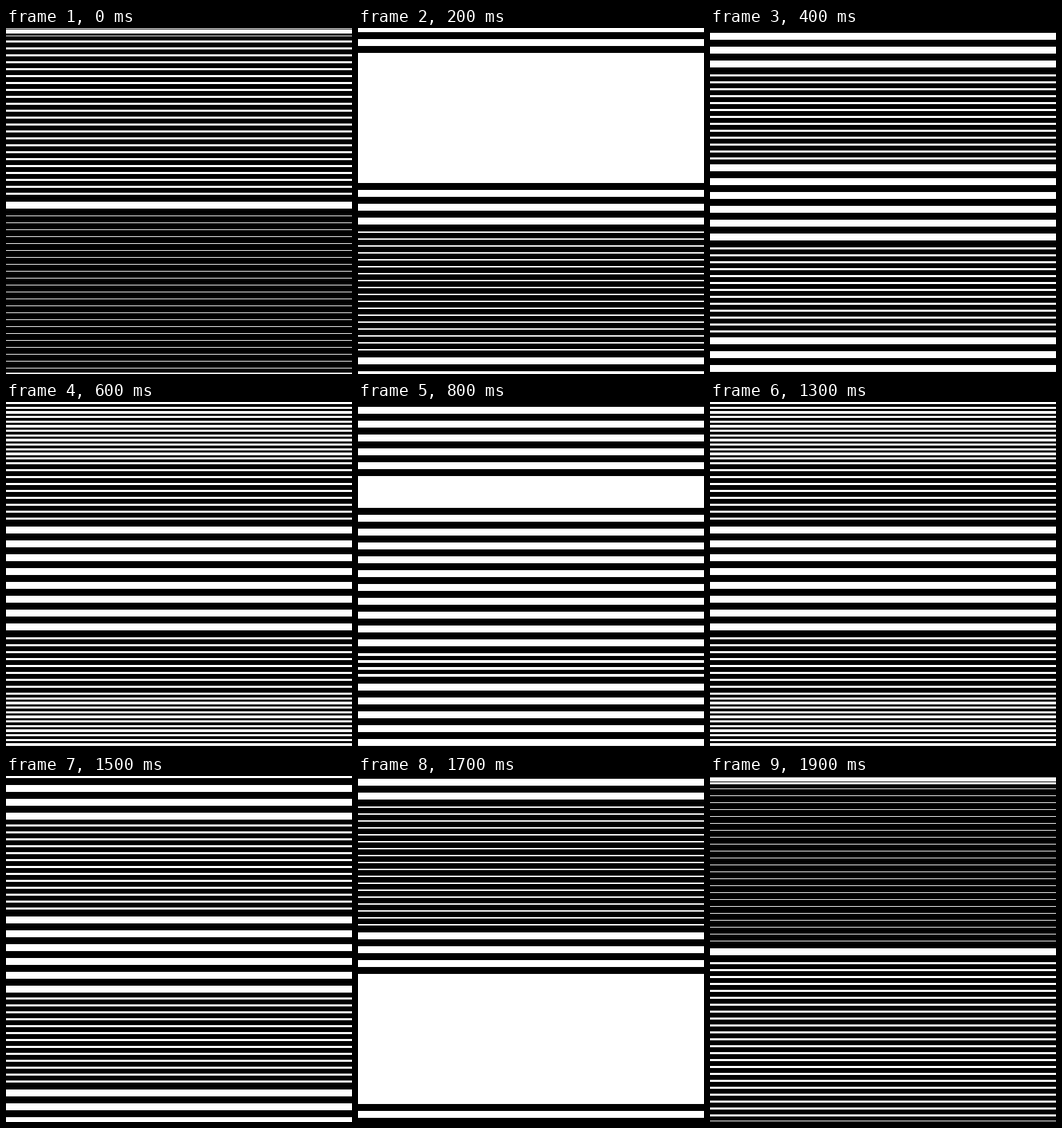
Recreate the animation shown at these times as an HTML page with a canvas. Size 500x500 px, loop 2000 ms.

```html
<!DOCTYPE html>
<html lang="en">
<head>
<meta charset="utf-8">
<title>Interfering stripes</title>
<style>
  html, body { margin: 0; width: 100%; height: 100%; overflow: hidden; background: #fff; }
  canvas { display: block; width: 100vw; height: 100vh; image-rendering: pixelated; }
</style>
</head>
<body>
<canvas id="stage" width="500" height="500"></canvas>
<script>
const SIZE = 500, STEPS = 20, STEP_MS = 100;
const BAND = 10;    // distance between neighbouring edges
const EDGES = 25;   // edges in each sliding group
const ctx = document.getElementById('stage').getContext('2d');

// Number of a group's edges at or above y.
const edgesPassed = (y, start) =>
  Math.max(0, Math.min(EDGES, Math.floor((y - start) / BAND) + 1));

// Endless stripes scroll down while two edge groups slide through each other;
// every edge passed inverts the colour.
function draw(step) {
  const p = step / (STEPS - 1);
  const scroll = 1 + 218 * p;
  const groupA = 272 + 226 * p;
  const groupB = 770 - groupA;
  const seam = SIZE / 2 + 5;

  ctx.fillStyle = '#fff';
  ctx.fillRect(0, 0, SIZE, SIZE);
  ctx.fillStyle = '#000';
  for (let row = 0; row < SIZE; row++) {
    const y = row + 0.5 + (row < seam ? SIZE : 0);
    const flips = Math.floor((y - scroll) / BAND)
      + edgesPassed(y, groupA) + edgesPassed(y, groupB);
    if (flips % 2 === 0) ctx.fillRect(0, row, SIZE, 1);
  }
}

const origin = performance.now();
let shown = 0;
function tick() {
  const step = Math.floor((performance.now() - origin) / STEP_MS) % STEPS;
  if (step !== shown) draw(shown = step);
  requestAnimationFrame(tick);
}
draw(0);
requestAnimationFrame(tick);
</script>
</body>
</html>
```
